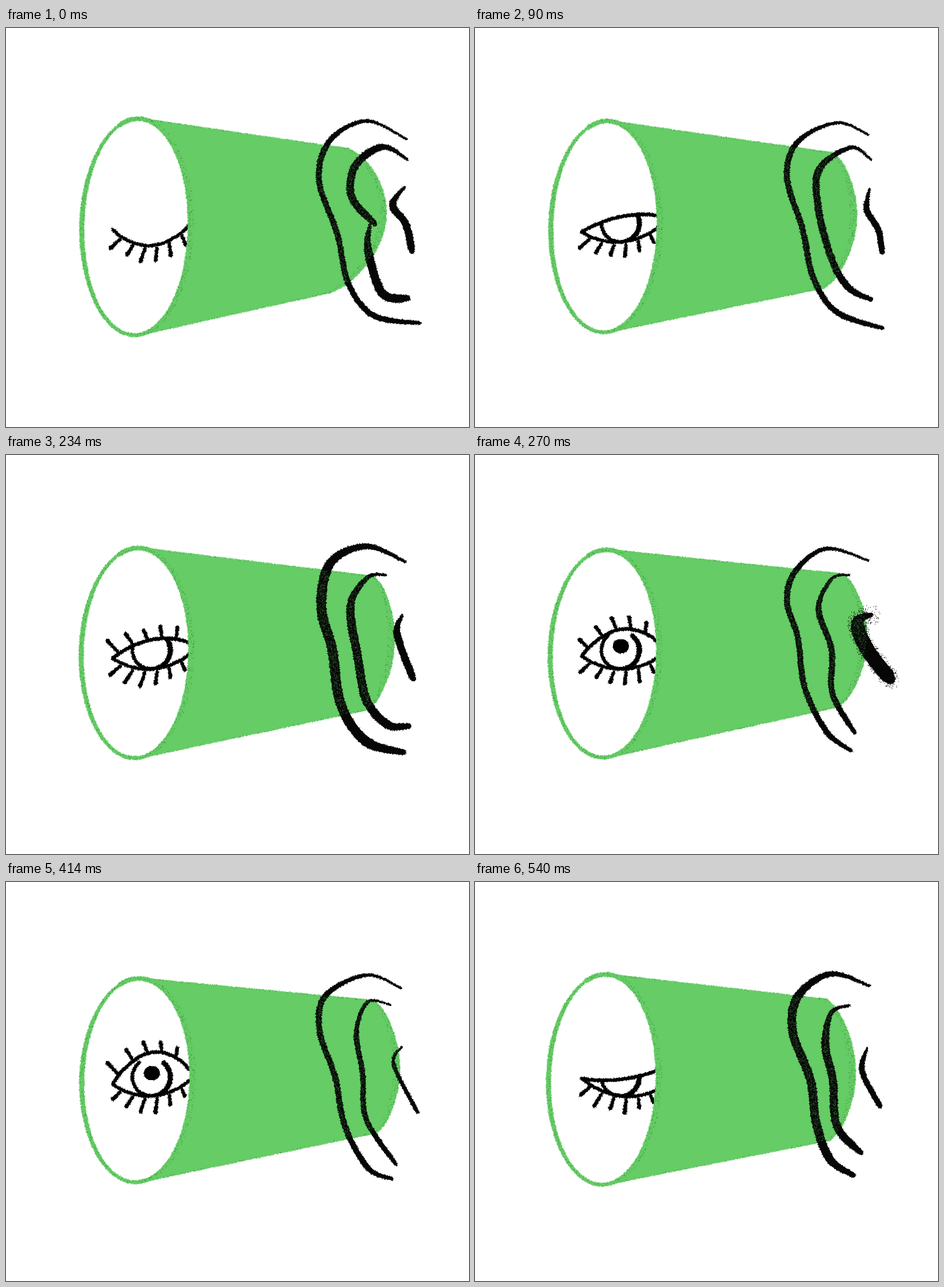
An HTML page with a canvas for the animation above (0.63 s loop, 806x695 px).

```html
<!DOCTYPE html>
<html lang="en">
<head>
<meta charset="utf-8">
<title>Blinking cup</title>
<style>
html, body { margin: 0; width: 100%; height: 100%; overflow: hidden; background: #fff; }
canvas { display: block; }
</style>
</head>
<body>
<canvas id="stage" width="806" height="695"></canvas>
<script>
const W = 806, H = 695, HOLD = 90, { PI, sin, cos, hypot } = Math;
const GREEN = '#66cc66', INK = '#080808', SHADE = 'rgba(35,90,35,.6)';
const start = performance.now();

// rim: left, right, top, bottom      cap: top x y, bottom x y, rightmost x
// eye: corner y, upper lid y (0 = shut), lower lid's right end y
// hair: brush width, then key points
const poses = [
  {
    rim: [132, 322, 158, 535], cap: [596, 211, 565, 460, 661], eye: [351, 0, 343],
    hair: [
      '10 698 194 628 162 564 196 545 265 577 360 596 445 640 501 720 514',
      '13 699 229 655 207 608 240 602 295 643 342',
      '15 634 342 630 385 655 462 700 471',
      '13 694 277 673 308 696 342 707 390']
  },
  {
    rim: [132, 322, 162, 530], cap: [622, 218, 608, 452, 664], eye: [355, 329, 347],
    hair: [
      '10 685 186 630 165 562 198 543 260 570 350 589 435 630 495 710 523',
      '12 690 230 655 208 600 245 597 310 620 400 650 452 690 473',
      '11 687 280 682 316 702 352 709 392']
  },
  {
    rim: [131, 323, 162, 528], cap: [640, 212, 630, 443, 676], eye: [354, 322, 347],
    hair: [
      '17 695 186 628 159 565 188 549 265 568 340 583 435 627 499 692 518',
      '15 661 209 630 213 600 262 612 350 628 428 665 470 702 472',
      '13 690 279 681 312 709 391']
  },
  {
    rim: [131, 321, 165, 527], cap: [640, 208, 632, 438, 682], eye: [350, 304, 352],
    dusty: true,
    hair: [
      '10 685 184 612 163 558 202 543 255 562 318 574 405 612 482 655 515',
      '10 652 209 622 215 598 268 621 340 622 415 661 484',
      '25 690 278 665 292 684 340 724 392']
  },
  {
    rim: [132, 325, 168, 523], cap: [640, 207, 645, 436, 685], eye: [352, 297, 346],
    hair: [
      '10 688 185 628 162 556 198 546 260 573 340 590 425 630 498 672 517',
      '9 670 214 630 209 610 262 621 335 627 413 679 492',
      '7 689 287 675 318 717 402']
  },
  {
    rim: [134, 311, 162, 524], cap: [640, 208, 637, 441, 684], eye: [351, 313, 350],
    ink: '#303030',
    hair: [
      '9 690 180 632 152 560 200 549 260 583 345 594 420 630 496 712 525',
      '10 688 222 635 212 613 275 630 345 630 420 688 479',
      '10 681 317 692 349 706 390']
  },
  {
    rim: [128, 320, 161, 527], cap: [612, 205, 618, 449, 662], eye: [342, 344, 360],
    hair: [
      '15 687 181 620 160 563 198 553 260 584 345 594 420 618 483 659 511',
      '14 652 215 620 228 610 285 623 345 630 425 672 472',
      '10 683 289 674 330 706 392']
  }
];

let seed = 1;
function rnd() {
  seed = (Math.imul(seed, 1664525) + 1013904223) >>> 0;
  return seed / 4294967296;
}

const mix = (a, b, t) => a + (b - a) * t;
const trace = (n, f) => Array.from({ length: n + 1 }, (_, i) => f(i / n));

// Catmull-Rom samples about one pixel apart
function curve(pts) {
  const out = [];
  for (let i = 0; i < pts.length - 1; i++) {
    const b = pts[i], c = pts[i + 1], a = pts[i - 1] || b, d = pts[i + 2] || c;
    const n = Math.ceil(hypot(c[0] - b[0], c[1] - b[1]));
    const at = (k, t) => b[k] + t / 2 * (c[k] - a[k] +
      t * (2 * a[k] - 5 * b[k] + 4 * c[k] - d[k] + t * (3 * (b[k] - c[k]) + d[k] - a[k])));
    for (let j = 0; j < n; j++) out.push([at(0, j / n), at(1, j / n)]);
  }
  out.push(pts[pts.length - 1]);
  return out;
}

function shape(pts) {
  const p = new Path2D();
  pts.forEach(([x, y]) => p.lineTo(x, y));
  p.closePath();
  return p;
}

function speck(g, x, y, r, size) {
  const a = rnd() * 2 * PI;
  g.fillRect(x + r * cos(a) - size / 2, y + r * sin(a) - size / 2, size, size);
}

// Solid core with a ragged crayon edge; width is a function of progress
function brush(g, pts, color, width) {
  const line = curve(pts);
  g.fillStyle = color;
  line.forEach((p, i) => {
    const w = p[2] = width(i / line.length), r = Math.max(0.6, w / 2 - 0.6);
    g.beginPath();
    g.arc(p[0], p[1], r, 0, 2 * PI);
    g.fill();
    for (let k = 0; k < 3; k++) speck(g, p[0], p[1], r + rnd() * 1.3, 1.4);
  });
  return line;
}

function grain(g, line, color, density, spread = 0.5) {
  g.fillStyle = color;
  for (const [x, y, w] of line) {
    for (let n = w * density + rnd(); n >= 1; n--) speck(g, x, y, w * spread * Math.sqrt(rnd()), 1.1);
  }
}

function greenBrush(g, pts, width) {
  grain(g, brush(g, pts, GREEN, width), SHADE, 0.06);
}

function drawCup(g, rim, [tx, ty, bx, by, right]) {
  const bulge = right - (tx + bx) / 2;
  const cap = trace(16, s => [mix(tx, bx, s) + bulge * sin(PI * s) ** 0.7, mix(ty, by, s)]);
  // tangents from the cap's ends to the rim
  const slope = (x, y) => p => (y - p[1]) / (x - p[0]);
  const top = slope(tx, ty), bottom = slope(bx, by);
  const from = rim.reduce((a, b) => top(b) > top(a) ? b : a);
  const to = rim.reduce((a, b) => bottom(b) < bottom(a) ? b : a);
  const body = shape([from, ...curve(cap), to]);
  g.fillStyle = GREEN;
  g.fill(body);
  greenBrush(g, [from, cap[0]], () => 2);
  greenBrush(g, [cap[16], to], () => 2);
  const band = s => 4 + 9 * sin(PI * s);
  greenBrush(g, cap.map(([x, y], i) => [x - band(i / 16) / 2 + 1, y]), band);
  g.fillStyle = '#fff';
  g.fill(shape(rim));
  return body;
}

function drawEye(g, [corner, top, end]) {
  const lid = (y0, y1, mid) => u =>
    [mix(186, 319, u), mix(y0, y1, u) + (mid - (y0 + y1) / 2) * sin(PI * u) ** 0.8];
  const lower = lid(corner, end, top ? 373 : 379), upper = lid(corner, 327, top);
  const black = (pts, width) => brush(g, pts, '#000', width);
  const lash = ([x, y], dx, dy) => {
    const k = 0.8 + 0.4 * rnd();
    black([[x, y], [x + dx * k, y + dy * k]], t => 5 + 2 * t);
  };
  const fan = i => -16 + 4.5 * i;

  black(trace(12, lower), () => 5.5);
  for (let i = 0; i < 6; i++) {
    const [x, y] = lower(0.1 + 0.16 * i);
    lash([x, y + 5], fan(i), 12 + 9 * sin(PI * (i + 0.5) / 6));
  }
  if (!top) return;

  black(trace(12, upper), () => 6);
  if (top < 325) {
    for (let i = 0; i < 5; i++) {
      const [x, y] = upper(0.07 + 0.19 * i);
      lash([x, y - 3], fan(i), -17);
    }
  }
  g.save();
  g.clip(shape([...trace(20, upper), ...trace(20, lower).reverse()]));
  const angle = t => mix(-0.28, 1.28, t) * PI;
  black(trace(16, t => [253 + 33 * cos(angle(t)), 340 + 33 * sin(angle(t))]),
    t => 7 + 1.5 * cos(angle(t)));
  if (top < 320) black([[252, 333], [256, 333]], () => 25);
  g.restore();
}

function paint({ rim: [l, r, t, b], cap, eye, hair, dusty, ink = INK }, index) {
  const sheet = document.createElement('canvas');
  sheet.width = W;
  sheet.height = H;
  const g = sheet.getContext('2d');
  seed = 7919 * (index + 1);
  g.fillStyle = '#fff';
  g.fillRect(0, 0, W, H);

  // the rim is one clockwise stroke that starts upper left
  const angle = s => (2 * s - 0.61) * PI;
  const rim = trace(72, s => {
    const c = cos(angle(s)), d = sin(angle(s));
    return [(l + r) / 2 + (r - l) / 2 * c - 3 * d, (t + b) / 2 + (b - t) / 2 * d];
  });
  const body = drawCup(g, rim, cap);
  g.save();
  g.clip(shape(rim));
  drawEye(g, eye);
  g.restore();
  greenBrush(g, rim, s => {
    const c = cos(angle(s));
    return (7 + 3.5 * c * c + c - 0.8 * sin(angle(s))) * (1 - 0.4 * s ** 6);
  });

  const taper = s => Math.min(1, 0.25 + 2.5 * s, 0.55 + 4 * (1 - s));
  const lines = hair.map(text => {
    const [w, ...n] = text.split(' ').map(Number);
    const pts = trace(n.length / 2 - 1, s => 2 * Math.round(s * (n.length / 2 - 1)))
      .map(i => [n[i], n[i + 1]]);
    return brush(g, pts, ink, s => w * taper(s));
  });
  if (dusty) grain(g, lines[2].map(([x, y]) => [x, y, 20]), ink, 0.35, 0.9);
  g.save();
  g.clip(body);
  for (const line of lines) grain(g, line, 'rgba(102,204,102,.38)', 0.2);
  g.restore();
  return sheet;
}

const view = document.getElementById('stage').getContext('2d');
const sheets = [];

function tick() {
  const i = Math.floor((performance.now() - start) / HOLD) % poses.length;
  sheets[i] = sheets[i] || paint(poses[i], i);
  view.drawImage(sheets[i], 0, 0);
  requestAnimationFrame(tick);
}
tick();
</script>
</body>
</html>
```
